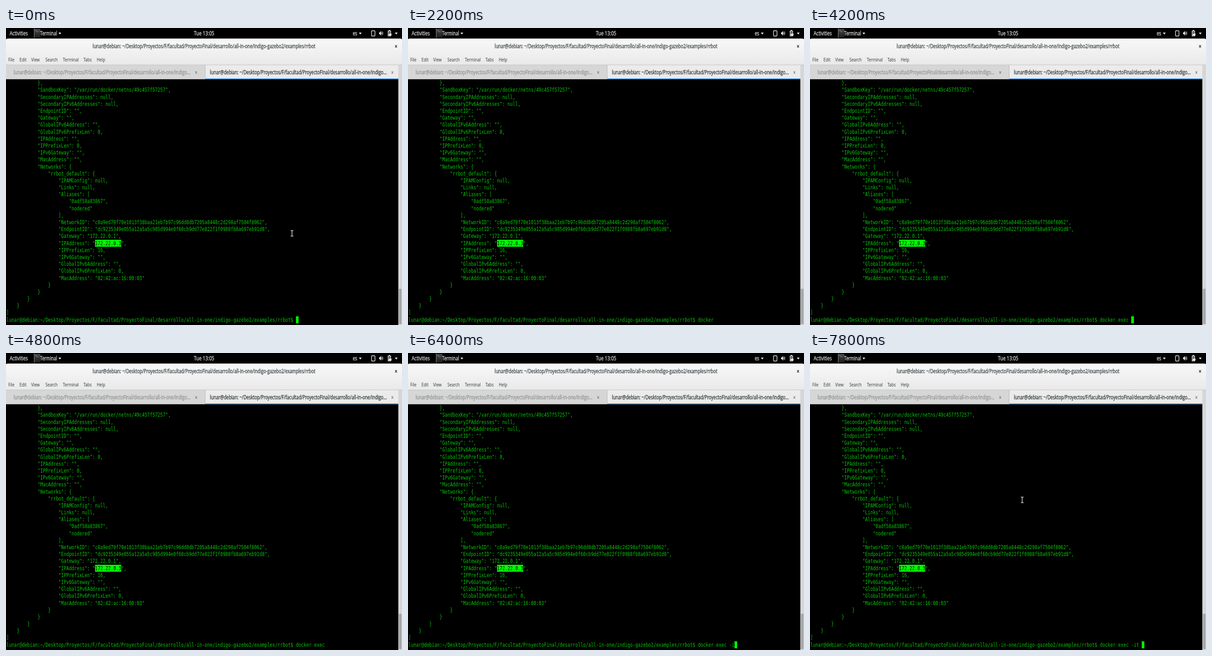
An HTML page with a canvas that plays this animation: 864 px wide and 648 px high, repeating every 8 s.

```html
<!DOCTYPE html>
<html lang="en">
<head>
<meta charset="utf-8">
<title>Terminal session</title>
<style>
  html, body { margin: 0; width: 100%; height: 100%; overflow: hidden; background: #000; }
  canvas { display: block; width: 864px; height: 648px; }
</style>
</head>
<body>
<canvas id="stage" width="864" height="648"></canvas>
<script>
const ctx = document.getElementById('stage').getContext('2d');
const LOOP = 8000;
// The 1366 x 768 desktop is shown on a 4:3 stage.
const SX = 864 / 1366, SY = 648 / 768, SQUASH = SX / SY;
const CELL_W = 9 * SX, CELL_H = 18 * SY, LEFT = 0.8, TOP = 112.7;
const UI = '"Open Sans", "Noto Sans", sans-serif';
const MONO = '12.61px "DejaVu Sans Mono", monospace';
const GREEN = '#00ff00', TEXT_GREEN = '#06c406', LIGHT = '#e6e6e6', DARK = '#2e3436';

const PATH = '~/Desktop/Proyectos/F/facultad/ProyectoFinal/desarrollo/all-in-one/indigo-gazebo2/examples/rrbot';
const HOST = 'lunar@debian:';
const TITLE = HOST + ' ' + PATH;
const TAB = TITLE.slice(0, TITLE.indexOf('-gazebo2')) + '...';
const PROMPT = HOST + PATH + '$ ';
const COMMAND = 'docker exec -it ';
const SELECTED = '172.22.0.3';

const OUTPUT = `            },
            "SandboxKey": "/var/run/docker/netns/49c457f57257",
            "SecondaryIPAddresses": null,
            "SecondaryIPv6Addresses": null,
            "EndpointID": "",
            "Gateway": "",
            "GlobalIPv6Address": "",
            "GlobalIPv6PrefixLen": 0,
            "IPAddress": "",
            "IPPrefixLen": 0,
            "IPv6Gateway": "",
            "MacAddress": "",
            "Networks": {
                "rrbot_default": {
                    "IPAMConfig": null,
                    "Links": null,
                    "Aliases": [
                        "0adf58a83867",
                        "nodered"
                    ],
                    "NetworkID": "c8a9ed79f70e1013f38baa21eb7b97c96dd8db7205a8448c2d298af7504f8062",
                    "EndpointID": "dc9235349e055a12a5a5c985d994e0f60cb9dd77e822f1f0988fb8a697eb91d8",
                    "Gateway": "172.22.0.1",
                    "IPAddress": "172.22.0.3",
                    "IPPrefixLen": 16,
                    "IPv6Gateway": "",
                    "GlobalIPv6Address": "",
                    "GlobalIPv6PrefixLen": 0,
                    "MacAddress": "02:42:ac:16:00:03"
                }
            }
        }
    }
]`.split('\n');

// [time, characters typed so far]
const KEYS = [
  [400, 1], [600, 2], [800, 3], [1000, 4], [1200, 6], [2400, 7], [3200, 8],
  [3400, 9], [3600, 10], [3800, 11], [4000, 12], [6200, 13], [6400, 14], [6600, 16]
];
// Spans in which the block cursor is blinked off.
const BLINKS = [[1800, 2400], [3000, 3200], [4600, 5200], [5600, 6200], [7200, 7800]];

function rect(x, y, w, h, color) {
  ctx.fillStyle = color;
  ctx.fillRect(x, y, w, h);
}

function text(str, x, y, font, color, align = 'left', bold = 0) {
  ctx.save();
  ctx.translate(x, y);
  ctx.scale(SQUASH, 1);
  ctx.font = font;
  ctx.textAlign = align;
  ctx.fillStyle = ctx.strokeStyle = color;
  ctx.lineWidth = bold;
  ctx.fillText(str, 0, 0);
  if (bold) ctx.strokeText(str, 0, 0);
  ctx.restore();
}

const label = (str, x, y, size, color, align, bold) =>
  text(str, x, y, `${size}px ${UI}`, color, align, bold);

function shade(y, h, from, to) {
  const g = ctx.createLinearGradient(0, y, 0, y + h);
  g.addColorStop(0, from);
  g.addColorStop(1, to);
  return g;
}

function shape(points, color) {
  ctx.fillStyle = color;
  ctx.beginPath();
  points.forEach(([x, y]) => ctx.lineTo(x, y));
  ctx.fill();
}

function line(x1, y1, x2, y2, color, width = 1) {
  ctx.strokeStyle = color;
  ctx.lineWidth = width;
  ctx.beginPath();
  ctx.moveTo(x1, y1);
  ctx.lineTo(x2, y2);
  ctx.stroke();
}

const arrow = x => shape([[x - 3, 10], [x + 3, 10], [x, 14.3]], LIGHT);

function cross(x, y, r, color, width) {
  line(x - r * SQUASH, y - r, x + r * SQUASH, y + r, color, width);
  line(x - r * SQUASH, y + r, x + r * SQUASH, y - r, color, width);
}

function panel() {
  rect(0, 0, 864, 24, '#000');
  label('Activities', 8, 16, 12.8, LIGHT, 'left', 0.3);
  rect(61, 1, 1, 21, '#8a8a8a');
  rect(62, 2, 13, 19, shade(2, 19, '#484848', '#1c1c1c'));
  line(64, 5, 67, 7, '#aaa');
  line(67, 8, 71, 8, '#888');
  label('Terminal', 74.5, 16, 12.2, LIGHT, 'left', 0.3);
  arrow(117.5);
  label('Tue 13:05', 432.3, 16, 13.2, LIGHT, 'center', 0.3);
  label('es', 756.5, 16, 12.7, LIGHT, 'left', 0.3);
  arrow(773);

  ctx.strokeStyle = LIGHT;
  ctx.lineWidth = 1.4;
  ctx.beginPath();
  ctx.roundRect(797.5, 6, 7.5, 11.5, 1.5);
  ctx.stroke();

  shape([[814, 9.5], [816, 9.5], [818.5, 6], [818.5, 17], [816, 13.5], [814, 13.5]], LIGHT);
  [2, 4].forEach((r, i) => {
    ctx.strokeStyle = i ? '#999' : LIGHT;
    ctx.beginPath();
    ctx.ellipse(818.5, 11.5, r, r * 1.3, 0, -0.9, 0.9);
    ctx.stroke();
  });

  ctx.strokeStyle = LIGHT;
  ctx.strokeRect(833.7, 6.7, 5.6, 10.6);
  rect(835, 4.5, 3, 2, LIGHT);
  rect(835, 9, 3, 1.4, LIGHT);
  rect(835, 12, 6, 4.5, LIGHT);
  arrow(851.5);
}

function chrome() {
  ctx.fillStyle = shade(23, 58, '#f8f8f8', '#e9e9e9');
  ctx.beginPath();
  ctx.roundRect(0, 23, 864, 58, [4, 4, 0, 0]);
  ctx.fill();
  label(TITLE, 432, 44.2, 12.16, '#394246', 'center', 0.35);
  cross(851, 40, 2.6, DARK, 1.4);

  [['File', 5], ['Edit', 29.5], ['View', 55], ['Search', 86], ['Terminal', 124],
   ['Tabs', 169], ['Help', 198]].forEach(([s, x]) => label(s, x, 73, 11.4, DARK));

  rect(0, 80, 864, 32, '#d6d6d6');
  rect(435, 80, 421, 32, '#ebebeb');
  rect(0, 80, 864, 1, '#c4c4c4');
  rect(434, 81, 1, 31, '#b8b8b8');
  rect(0, 111, 435, 1, '#aaa');
  rect(435, 110, 421, 2, '#4a90d9');
  label(TAB, 16.5, 100.8, 12.18, '#8e9293', 'left', 0.35);
  label(TAB, 445, 100.8, 12.18, DARK, 'left', 0.35);
  cross(415, 97, 2.6, '#7d8182', 1.1);
  cross(843, 97, 2.6, '#7d8182', 1.1);
}

function cells(col, row, count) {
  rect(LEFT + col * CELL_W, TOP + row * CELL_H, count * CELL_W, CELL_H, GREEN);
}

function write(str, col, row, color = TEXT_GREEN) {
  text(str, LEFT + col * CELL_W, TOP + row * CELL_H + 11.6, MONO, color);
}

function terminal(t) {
  rect(0, 112, 856, 536, '#000');
  rect(856, 112, 8, 536, '#d6d6d6');
  rect(857, 569, 6, 77, '#a6a8a8');

  OUTPUT.forEach((str, row) => {
    const col = str.indexOf(SELECTED);
    if (col < 0) return write(str, 0, row);
    const end = col + SELECTED.length;
    write(str.slice(0, col), 0, row);
    cells(col, row, SELECTED.length);
    write(SELECTED, col, row, '#000');
    write(str.slice(end), end, row);
  });

  const typed = KEYS.reduce((n, [at, count]) => t >= at ? count : n, 0);
  const input = PROMPT + COMMAND.slice(0, typed);
  write(input, 0, OUTPUT.length);
  if (!BLINKS.some(([from, to]) => t >= from && t < to)) cells(input.length, OUTPUT.length, 1);
}

function pointer(x, y) {
  for (const [color, width] of [['#333', 2.6], ['#d0d0d0', 1.2]]) {
    line(x, y - 6, x, y + 6, color, width);
    line(x - 3, y - 6, x + 3, y - 6, color, width);
    line(x - 3, y + 6, x + 3, y + 6, color, width);
  }
}

function draw(t) {
  panel();
  chrome();
  terminal(t);
  // Typing hides the mouse pointer until it moves again.
  if (t < KEYS[0][0]) pointer(624, 448);
  else if (t >= 7800) pointer(463, 320.5);
}

function tick() {
  draw(performance.now() % LOOP);
  requestAnimationFrame(tick);
}
tick();
</script>
</body>
</html>
```
